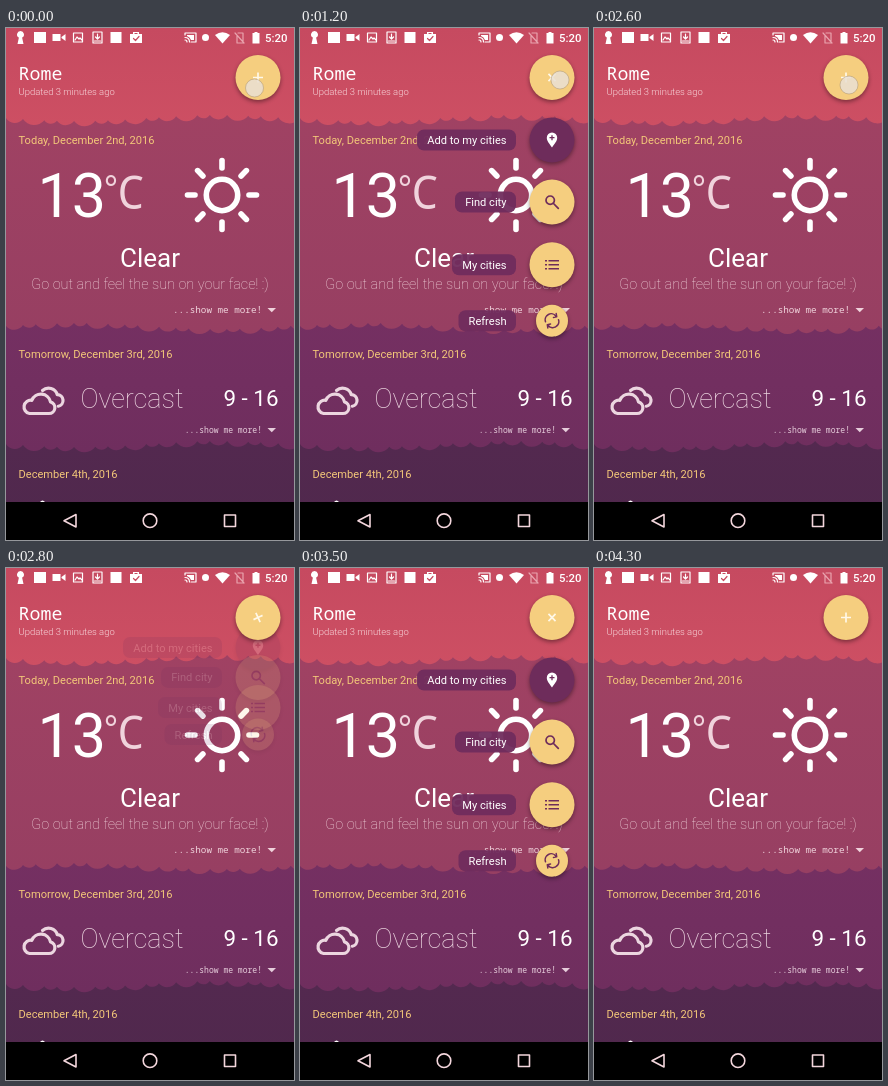
Animation of 288 by 512 pixels, one loop 5600 ms. Source, as an HTML page:

```html
<!DOCTYPE html>
<html lang="en">
<head>
<meta charset="utf-8">
<title>Weather menu</title>
<style>
html, body { margin: 0; width: 100%; height: 100%; overflow: hidden; background: #000; }
svg { display: block; width: 288px; height: 512px; font-family: Roboto, sans-serif; }
.mono { font-family: "Noto Sans Mono", monospace; }
.date { font-size: 11.1px; fill: #f3c779; }
.thin { font-weight: 200; }
.mid { text-anchor: middle; }
.end { text-anchor: end; }
.line { fill: none; stroke-linecap: round; stroke-linejoin: round; }
.item text { font-size: 11.1px; fill: #fff; text-anchor: end; }
.raised { filter: drop-shadow(0 2.5px 2px #0006); }
</style>
</head>
<body>
<svg viewBox="0 0 288 512">
  <g id="bands"></g>

  <!-- status bar -->
  <g fill="#fff">
    <path d="M14.5 3a3.5 3.5 0 0 1 1.6 6.6L17.5 16h-6l1.4-6.4A3.5 3.5 0 0 1 14.5 3z"/>
    <rect x="28" y="4" width="12" height="11"/>
    <path d="M46.5 6h8v7h-8zM55.500 9l4-3v7l-4-3z"/>
    <rect x="104.5" y="4" width="11" height="11"/>
    <path d="M124 6h3V4h6v2h3v9h-12zM128.500 6h3V5h-3z"/>
    <path d="M181 7h7v5h-3q-1-3-4-4z"/>
    <circle cx="199.5" cy="9.5" r="3.5"/>
    <path d="M209 7q7.5-5.500 15 0l-7.500 8.500z"/>
    <path d="M246.5 5h2V4h3v1h2v10.500h-7z"/>
    <text x="281.5" y="13.5" class="end" font-size="11.4" font-weight="500">5:20</text>
  </g>
  <g class="line" stroke="#fff" stroke-width="1.2">
    <path d="M67.500 5h9v9h-9zM69 12l2-3 2 2 1-1 2 2M87 4h9v11h-9zM91.500 6v5m-2-2 2 2 2-2M88.500 13h6"/>
    <path d="M179 7V5h11v9h-5M179 9.500q4.500 0 4.500 4.500M179 12q2 0 2 2"/>
    <path d="M127.500 10.500l2 2 3.500-4" stroke="#c84c61"/>
    <path d="M229 5l9 10M231 8v7h6M232 5h5v8" stroke="#e9a3ae"/>
  </g>

  <!-- header -->
  <text x="12.5" y="52" class="mono" font-size="18.3" fill="#fff">Rome</text>
  <text x="12.5" y="66.5" font-size="9.45" font-weight="300" fill="#f7d5da">Updated 3 minutes ago</text>

  <!-- today -->
  <text x="12.5" y="116" class="date">Today, December 2nd, 2016</text>
  <text x="31.5" y="188.5" font-size="61" fill="#fff">13</text>
  <g class="mono mid" fill="#f0d3dc">
    <text x="105" y="172.5" font-size="34" font-weight="500">°</text>
    <text x="125" y="181" font-size="46">C</text>
  </g>
  <g id="sun" class="line" stroke="#fff" stroke-width="5.6" transform="translate(216 167)"><circle r="15.7"/></g>
  <text x="144" y="238.5" class="mid" font-size="26" fill="#fff">Clear</text>
  <text x="144" y="261" class="mid thin" font-size="14.45" fill="#f3d6de">Go out and feel the sun on your face! :)</text>
  <g fill="#f0d3dc">
    <text x="256" y="285" class="mono end" font-size="9.27">...show me more!</text>
    <path d="M261.500 280h8.500l-4.250 4.300z"/>
  </g>

  <!-- tomorrow -->
  <text x="12.5" y="330" class="date">Tomorrow, December 3rd, 2016</text>
  <g class="line" stroke="#ecd6e0" stroke-width="3.2">
    <path d="M23.500 385.500H43a5.900 5.900 0 0 0 1.500-11.600A9.800 9.800 0 0 0 25.800 372.300A6.700 6.700 0 0 0 23.500 385.500z"/>
    <path d="M36.500 362.500a9 9 0 0 1 14.800 4.200a5.800 5.800 0 0 1 1 11.500"/>
  </g>
  <text x="74.5" y="379.5" class="thin" font-size="27" fill="#ecd6e0">Overcast</text>
  <text x="272.5" y="378" class="end" font-size="22.4" fill="#fff">9 - 16</text>
  <g fill="#e6cddb">
    <text x="256" y="405" class="mono end" font-size="8.05">...show me more!</text>
    <path d="M261.500 400h8.500l-4.250 4.300z"/>
  </g>

  <!-- day after, cut by the navigation bar -->
  <text x="12.5" y="450" class="date">December 4th, 2016</text>
  <path d="M34 474q2.500-3 5 0z" fill="#fff"/>
  <rect y="474" width="288" height="38"/>
  <g class="line" stroke="#f3d6dc" stroke-width="1.6">
    <path d="M70 486.500v12.500l-12-6.250zM218.500 487h11v11.500h-11z"/>
    <circle cx="144" cy="492.7" r="6.8"/>
  </g>

  <g id="menu"></g>
  <g transform="translate(252 49.5)">
    <circle class="raised" r="22.5" fill="#f5ce7f"/>
    <path id="plus" d="M-5 0H5M0-5V5" stroke="#fff8e8" stroke-width="1.7"/>
  </g>
  <circle id="touch" r="9" fill="#e9dfd3" fill-opacity=".85" stroke="#a89478" stroke-opacity=".5"/>
</svg>

<script>
const $ = id => document.getElementById(id);
const LOOP = 5600, FAB_Y = 49.5, MOVE = 300, PLUM = '#6e2c5b';

// Bands with a scalloped lower edge on a slow wave, painted from the bottom up
function band(top, bottom, from, to, phase) {
  let d = `M0 ${top}V${bottom}`;
  for (let i = 0, x = 0; x < 288; i++) {
    const w = 17 + 5 * Math.sin(i * 2.1 + phase);
    x += w;
    const y = bottom + 3 * Math.sin(x / 45 + phase);
    d += `A${w * .62} ${w * .62} 0 0 0 ${x} ${y}`;
  }
  return `<linearGradient id="g${top}" x2="0" y2="1"><stop stop-color="${from}"/>
    <stop offset="1" stop-color="${to}"/></linearGradient>
    <path d="${d}V${top}z" fill="url(#g${top})"/>`;
}
$('bands').innerHTML =
  band(400, 500, '#542950', '#4f284c', 0) +
  band(285, 416, '#753062', '#6f2e5e', 0) +
  band(80, 298, '#a04263', '#973f62', Math.PI) +
  band(0, 90, '#c64a60', '#cd4f63', 0);

for (let a = 0; a < 360; a += 45)
  $('sun').innerHTML += `<path d="M0-27V-34.500" transform="rotate(${a})"/>`;

const arrow = '<path d="M-6.500 1A6 6 0 0 1 4-4.500M1.500-3.300l3.200-.7-.5-3.200"/>';
const icons = {
  pin: `<path d="M0 7.500C-3 3-5.200 1-5.200-2.300a5.200 5.200 0 0 1 10.400 0C5.200 1 3 3 0 7.500z" fill="#fff"/>
    <path d="M-2.500-2.300h5M0-4.800v5" stroke="${PLUM}" stroke-width="1.3"/>`,
  search: `<g class="line" stroke="${PLUM}" stroke-width="1.7"><circle cx="-1.8" cy="-1.8" r="4.2"/>
    <path d="M1.500 1.500L6.300 6.300"/></g>`,
  list: `<path d="M-7-4h2m1.500 0H7M-7 0h2m1.500 0H7M-7 4h2m1.500 0H7" stroke="${PLUM}" stroke-width="1.6"/>`,
  refresh: `<g class="line" stroke="${PLUM}" stroke-width="1.5">${arrow}<g transform="rotate(180)">${arrow}</g></g>`
};

// label, left edge of its plate, open y, radius, fill, icon
const items = [
  ['Add to my cities', 117, 112, 22.5, PLUM, icons.pin],
  ['Find city', 155, 174, 22.5, '#f5ce7f', icons.search],
  ['My cities', 152, 236.7, 22.5, '#f5ce7f', icons.list],
  ['Refresh', 158.5, 292.7, 16, '#f5ce7f', icons.refresh]
];
$('menu').innerHTML = items.map(([label, left, , r, fill, icon]) => `<g class="item">
  <rect x="${left}" y="-10.5" width="${216 - left}" height="21" rx="7" fill="#702d5d" opacity=".95"/>
  <text x="206.5" y="4">${label}</text>
  <g transform="translate(252)"><circle class="raised" r="${r}" fill="${fill}"/>${icon}</g>
</g>`).join('');
const rows = [...$('menu').children];

const overshoot = p => 1 + (p - 1) ** 2 * (3 * (p - 1) + 2);
const decelerate = p => 1 - (1 - p) ** 6;

// [start, opens]
const moves = [[66, true], [1366, false], [2766, true], [3966, false]];
// [from, to, x, y]
const touches = [[0, 100, 248.5, 60], [1200, 1400, 260, 52], [2600, 2800, 255, 57], [3900, 4000, 256, 53]];

function draw(t) {
  const [start, opens] = moves.findLast(m => m[0] <= t) || [-MOVE, false];
  const p = Math.min(1, (t - start) / MOVE);
  const shift = opens ? overshoot(p) : 1 - decelerate(p);
  const alpha = opens ? 1 - (1 - p) ** 1.4 : 1 - decelerate(p);
  const turn = opens ? overshoot(p) : 1 - overshoot(p);

  rows.forEach((row, i) => {
    row.setAttribute('transform', `translate(0 ${FAB_Y + (items[i][2] - FAB_Y) * shift})`);
    row.setAttribute('opacity', alpha);
  });
  $('plus').setAttribute('transform', `rotate(${135 * turn})`);

  const touch = touches.find(([from, to]) => t >= from && t < to);
  $('touch').setAttribute('visibility', touch ? 'visible' : 'hidden');
  if (touch) $('touch').setAttribute('transform', `translate(${touch[2]} ${touch[3]})`);
}

// The picture advances ten times a second
const begin = performance.now();
function tick() {
  draw(Math.floor((performance.now() - begin) % LOOP / 100) * 100);
  requestAnimationFrame(tick);
}
tick();
</script>
</body>
</html>
```
